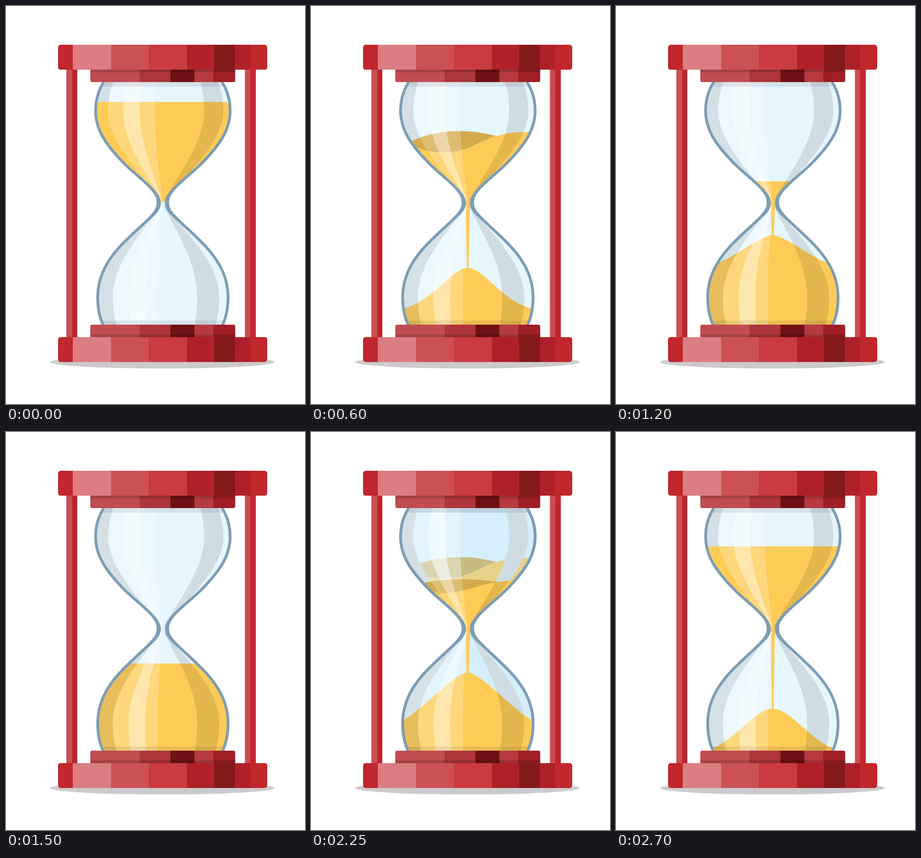
An HTML page that plays this animation: 649x863 px, repeating every 2850 ms.

```html
<!DOCTYPE html>
<html lang="en">
<head>
<meta charset="utf-8">
<title>Hourglass</title>
<style>
html, body { margin: 0; width: 100%; height: 100%; overflow: hidden; background: #fff; }
svg { display: block; width: 100vw; height: 100vh; }
</style>
</head>
<body>
<svg id="stage" viewBox="0 0 649 863"></svg>
<script>
const STEP = 150, STEPS = 19;
const SAND = '#fecb57', BACK = '#d4aa4b', WALL = '#7d9db4', PALE = '#e6f6fd';
const MIRROR = 'transform="translate(681 0) scale(-1 1)"';

const path = (d, fill, extra = '') => `<path d="${d}" fill="${fill}" ${extra}/>`;
const rect = (x, y, w, h, fill, extra = '') =>
  `<rect x="${x}" y="${y}" width="${w}" height="${h}" fill="${fill}" ${extra}/>`;
const clipped = (id, body) => `<g clip-path="url(#${id})">${body}</g>`;
const both = d => d + d.replace('<path', `<path ${MIRROR}`);

// Left wall of the glass; the right one is its mirror image.
const wall = 'M212 165C200 184 194.5 204 194.5 227C194.5 271 220 304 256 341' +
  'C290 375 331 399 331 427C331 447 304 466 268 501' +
  'C228 538 199 578 199 632C199 655 203 675 211 692';
const neck = 'M299 380C321 396 327 412 327 427C327 444 312 458 294 475' +
  'L299 475C318 458 336 446 336 427C336 412 324 398 303 381Z';

// Reflections are bands between curves that meet at the neck.
const lean = (x, k) => x + k * (340 - x);
const upperDown = x => `${lean(x, .09)} 165Q${x} 195 ${x} 228C${x} 300 ${lean(x, .7)} 375 340 427`;
const upperUp = x => `C${lean(x, .7)} 375 ${x} 300 ${x} 228Q${x} 195 ${lean(x, .09)} 165Z`;
const lowerDown = x => `340 427C${lean(x, .7)} 480 ${x} 550 ${x} 632Q${x} 665 ${lean(x, .07)} 692`;
const lowerUp = x => `L${lean(x, .07)} 692Q${x} 665 ${x} 632C${x} 550 ${lean(x, .7)} 480 340 427Z`;
const upperBand = (a, b, fill, o = 1) => path('M' + upperDown(a) + upperUp(b), fill, `opacity="${o}"`);
const lowerBand = (a, b, fill, o = 1) => path('M' + lowerDown(a) + lowerUp(b), fill, `opacity="${o}"`);

// Shaded bands are opaque behind the sand, the rest of the glass is clear.
const glassBack = rect(190, 165, 300, 527, '#ace1f8', 'opacity=".3"') +
  upperBand(100, 222, '#d4e0e6') + upperBand(430, 472, PALE) +
  lowerBand(100, 232, PALE) + lowerBand(415, 463, PALE);
const glassFront =
  upperBand(222, 323, '#fff', .22) + upperBand(254, 290, '#fff', .37) +
  upperBand(430, 472, '#000', .1) +
  lowerBand(100, 232, '#777', .16) + lowerBand(232, 329, '#fff', .22) +
  lowerBand(266, 302, '#fff', .37) + lowerBand(415, 463, '#000', .1) +
  rect(190, 165, 300, 10, '#000', 'opacity=".08"') +
  rect(190, 682, 300, 10, '#000', 'opacity=".08"');
const glassWall = both(path(wall, 'none', `stroke="${WALL}" stroke-width="6"`)) +
  both(path(neck, WALL));

const level = (y, bottom) => rect(190, y, 300, bottom - y, SAND);
const stream = top => path(`M335 415H346L344.5 450L342 ${top + 4}H338.5L336 450Z`, SAND);
const pile = (top, edge, half, foot, round) => path(
  `M${340 - half} ${edge}C${340 - foot[0]} ${foot[1]} ${340 - round} ${top} 340 ${top}` +
  `C${340 + round} ${top} ${340 + foot[0]} ${foot[1]} ${340 + half} ${edge}V700H${340 - half}Z`, SAND);
const slope = (back, front, rest) =>
  path(back + front, BACK) + path(front.replace('L', 'M') + rest + 'V430H200Z', SAND);

const sands = [
  path('M190 430V216Q198 208 206 208H474Q481 208 485 216V425H190Z', SAND),
  level(248, 430) + stream(600) + pile(600, 687, 138, [88, 677], 40),
  slope('M402 282C340 264 260 268 212 297', 'L212 292C232 318 285 322 322 314C352 307 372 291 402 282',
    'C430 274 450 272 482 274') + stream(568) + pile(568, 657, 145, [78, 645], 36),
  slope('M405 325C350 317 290 317 240 328', 'L240 326C262 354 285 351 312 347C350 341 372 330 405 325',
    'C420 323 430 322 446 322') + stream(522) + pile(522, 627, 143, [90, 597], 30),
  level(380, 430) + stream(497) + pile(497, 557, 120, [78, 543], 26) + rect(190, 556, 300, 140, SAND),
  level(502, 700)
];
const stages = sands.map(s => '<g class="stage">' +
  clipped('glass', glassBack + s + glassFront) + glassWall + '</g>').join('');

// Facets: each entry is a right edge and its colour.
const facets = (x, y, h, list) => list.map(([end, fill]) => {
  const r = rect(x, y, end - x + .3, h, fill);
  x = end;
  return r;
}).join('');
const capTones = [[145, '#c1272d'], [228, '#dc7d82'], [310, '#cc5157'], [393, '#c93b40'],
  [452, '#ae212a'], [497, '#84191e'], [530, '#ae212a'], [567, '#c1272d']];
const rimTones = [[290, '#c14c51'], [357, '#ad353b'], [409, '#6f1116'], [450, '#b63a41'], [498, '#a01e27']];
const cap = (id, y) => clipped(id, facets(113, y, 54, capTones));
const rim = (id, y, shade) => clipped(id, facets(183, y, 27, rimTones) +
  rect(183, shade, 315, 6, '#000', 'opacity=".15"'));
const clipRect = (id, x, y, w, h, r) =>
  `<clipPath id="${id}">${rect(x, y, w, h, '#000', `rx="${r}"`)}</clipPath>`;

const svg = document.getElementById('stage');
svg.innerHTML =
  `<defs><clipPath id="glass">${both(path(wall + 'H341V165Z', '#000'))}</clipPath>` +
  clipRect('capTop', 113, 84, 454, 54.5, 6) + clipRect('capBase', 113, 717.5, 454, 54.5, 6) +
  clipRect('rimTop', 183, 130, 314.5, 35, 4) + clipRect('rimBase', 183, 691, 314.5, 35, 4) + '</defs>' +
  rect(0, 0, 649, 863, '#fff') +
  '<ellipse cx="339.5" cy="772" rx="243.5" ry="14" fill="#cbcbcb"/>' +
  facets(131, 137, 582, [[144, '#c94e54'], [154.5, '#b9242c']]) +
  facets(518.5, 137, 582, [[530, '#c94e54'], [542, '#c1272d']]) +
  stages +
  rim('rimTop', 138, 138) + rim('rimBase', 691, 712) +
  cap('capTop', 84) + cap('capBase', 718);

const groups = [...svg.querySelectorAll('.stage')];

// The sand runs down and back; odd steps show two neighbouring stages at once.
function draw(ms) {
  const step = Math.floor(ms / STEP) % STEPS;
  const pos = (step <= 10 ? step : 20 - step) / 2;
  groups.forEach((g, i) => {
    g.style.display = Math.abs(i - pos) < 1 ? '' : 'none';
  });
}

let start;
function tick(now) {
  start ??= now;
  draw(Math.max(0, now - start));
  requestAnimationFrame(tick);
}
draw(0);
requestAnimationFrame(tick);
</script>
</body>
</html>
```
